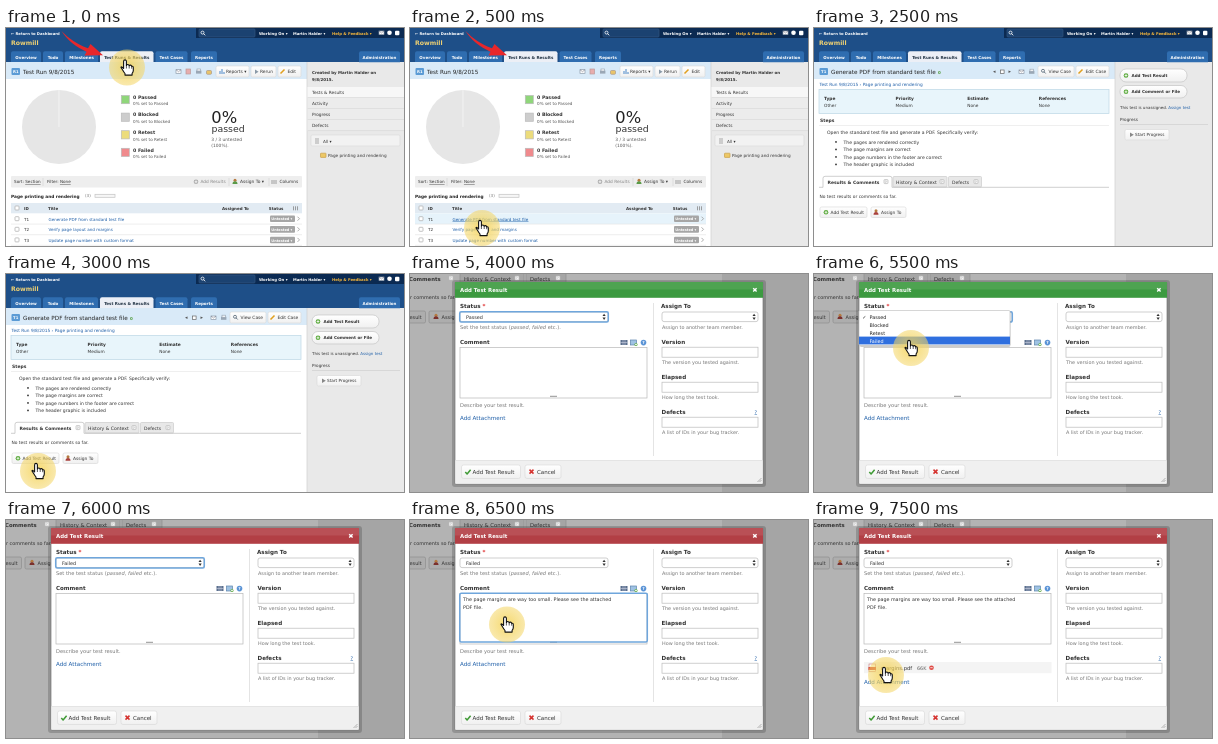
These frames come from a looping animation (398x218 px, 8 s). An HTML page:

```html
<!DOCTYPE html>
<html lang="en">
<head>
<meta charset="utf-8">
<title>Test run walkthrough</title>
<style>
html, body { margin: 0; width: 100%; height: 100%; overflow: hidden; background: #fff; }
svg { display: block; width: 100vw; height: 100vh; font-family: "DejaVu Sans", Verdana, sans-serif; }
text { white-space: pre; }
</style>
</head>
<body>
<svg id="stage" viewBox="0 0 398 218"></svg>
<script>
const INK = '#333', GREY = '#777', LINK = '#1f5fa8', NAVY = '#1e4f88';

const rect = (x, y, w, h, fill, stroke = 'none', r = 0) =>
  `<rect x="${x}" y="${y}" width="${w}" height="${h}" rx="${r}" fill="${fill}" stroke="${stroke}" stroke-width=".7"/>`;
const text = (x, y, s, size = 4.15, fill = INK, attrs = '') =>
  `<text x="${x}" y="${y}" font-size="${size}" fill="${fill}" ${attrs}>${s}</text>`;
const bold = (x, y, s, size = 4.1, fill = INK) => text(x, y, s, size, fill, 'font-weight="700"');
const dot = (x, y, r, fill) => `<circle cx="${x}" cy="${y}" r="${r}" fill="${fill}"/>`;
const path = (d, fill = 'none', stroke = 'none', w = 1) =>
  `<path d="${d}" fill="${fill}" stroke="${stroke}" stroke-width="${w}" stroke-linejoin="round"/>`;
const group = (id, body) => `<g id="${id}">${body}</g>`;
const each = (list, fn) => list.map(fn).join('');
const fade = (opacity, body) => `<g opacity="${opacity}">${body}</g>`;

const plus = (x, y, r = 2.3) => dot(x, y, r, '#58a838') +
  path(`M${x - r * .6} ${y}h${r * 1.2}M${x} ${y - r * .6}v${r * 1.2}`, 'none', '#fff', .8);
const pencil = (x, y) => path(`M${x - 2} ${y + 2}l4 -4`, 'none', '#e0a020', 1.6);
const person = (x, y, c) => dot(x, y - 1.4, 1.5, '#b5793f') + path(`M${x - 2.5} ${y + 2.5}a2.5 2.8 0 0 1 5 0z`, c);
const lens = (x, y, c) => `<circle cx="${x}" cy="${y}" r="1.5" fill="none" stroke="${c}" stroke-width=".8"/>` +
  path(`M${x + 1} ${y + 1}l1.7 1.7`, 'none', c, .9);
const mail = (x, y, c) => rect(x, y, 5, 3.6, c, '#8a98a8') + path(`M${x} ${y}l2.5 2l2.5 -2`, 'none', '#667', .5);
const printer = (x, y) => rect(x, y + 1.2, 5.4, 3, '#9aa7b5') + rect(x + 1, y - .4, 3.4, 2, '#fff', '#9aa7b5');
const columns = (x, y) => path(`M${x} ${y}v4M${x + 2} ${y}v4M${x + 4} ${y}v4`, 'none', '#888', .8);
const button = (x, y, w, h, label, dx, size = 4.4, r = 1.5) =>
  rect(x, y, w, h, 'url(#soft)', '#dcdcdc', r) + text(x + dx, y + h / 2 + size * .36, label, size);

const tabs = [[5, 30, 'Overview'], [37, 20, 'Todo'], [59, 33, 'Milestones'], [94, 53.5, 'Test Runs &amp; Results'],
  [149.5, 32, 'Test Cases'], [185, 26, 'Reports'], [353, 41, 'Administration']];

const header = rect(0, 0, 398, 218, '#fff') + rect(301, 34, 97, 184, '#e9e9e9') +
  rect(0, 0, 398, 34, NAVY) + rect(190, 0, 208, 10, '#0b2a52') +
  bold(5, 6.5, '← Return to Dashboard', 3.75, '#fff') +
  bold(5, 16.9, 'Rowmill', 6.2, '#f1d272') +
  rect(193, 1, 56, 8, '#1b4271', '#31557f', 1) + lens(196.5, 4.6, '#fff') +
  bold(253, 6.6, 'Working On ▾', 3.85, '#fff') + bold(287, 6.6, 'Martin Halder ▾', 3.75, '#fff') +
  bold(326, 6.6, 'Help &amp; Feedback ▾', 3.85, '#f5b63c') +
  mail(373, 3, '#fff') + dot(383.5, 4.8, 2.3, '#fff') + rect(389, 2.8, 4.4, 4.4, '#fff', 'none', 1) +
  each(tabs, ([x, w, s], i) => path(`M${x} 34.2v-9q0 -2 2 -2h${w - 4}q2 0 2 2v9z`, i === 3 ? '#eceff6' : '#2f6db0') +
    text(x + w / 2, 30.5, s, 4.05, i === 3 ? '#234' : '#fff', 'font-weight="700" text-anchor="middle"')) +
  rect(0, 34, 301, 17, '#d9eaf8') + path('M301 34v184', 'none', '#d0d0d0', .7);

const badge = (s) => rect(5.5, 40, 8.5, 7, '#5b9bd5', 'none', 1) + bold(7.1, 45.2, s, 3.8, '#fff');
const box = (x, y) => rect(x, y, 4, 4, '#fff', '#aaa', .7);

const counts = [['Passed', '#8fd67a'], ['Blocked', '#cdcdcd'], ['Retest', '#ecdc7c'], ['Failed', '#f08a8d']];
const tests = ['Generate PDF from standard test file', 'Verify page layout and margins', 'Update page number with custom format'];
const underlined = s => `<tspan text-decoration="underline">${s}</tspan>`;

const list = badge('R1') + text(17, 46, 'Test Run 9/8/2015', 5.7, '#222') +
  mail(170, 41.7, '#fff') + rect(180, 41, 4.5, 5, '#e7adad', '#b99') + printer(190, 41.4) + rect(200.5, 42.5, 5, 3.8, '#e9c46a', '#a98', 1) +
  button(210, 38, 33, 11, 'Reports ▾', 10) + path('M214 46v-3M216 46v-5M218 46v-2', 'none', '#4a87c8', 1) +
  button(245, 38, 25, 11, 'Rerun', 9) + path('M249 41.5v4.4l3.6 -2.2z', '#8a9aa8') +
  button(272, 38, 23, 11, 'Edit', 9.5) + pencil(276.5, 43.5) +
  dot(53, 99, 37, '#e6e6e6') + path('M53 62v37', 'none', '#f7f7f7', .8) +
  each(counts, ([s, c], i) => {
    const y = 67.5 + i * 17.6;
    return rect(115.3, y, 8, 8.2, c, '#bbb') + bold(127, y + 3.2, '0 ' + s, 4.7) + text(127, y + 9.9, '0% set to ' + s, 4.15, '#555');
  }) +
  text(205.3, 95, '0%', 16.3, '#222') + text(205.5, 104, 'passed', 9.4) +
  text(205.3, 112.6, '3 / 3 untested', 4.4, '#555') + text(205.3, 119, '(100%).', 4.4, '#555') +
  rect(5, 148, 291, 11.5, '#eee', 'none', 1) +
  text(8, 155.3, 'Sort: ' + underlined('Section')) + text(41, 155.3, 'Filter: ' + underlined('None')) +
  path('M37 150v8M223 150v8M263 150v8', 'none', '#d2d2d2', .6) +
  dot(190, 153.8, 2.3, '#aaa') + path('M188.6 153.8h2.8M190 152.4v2.8', 'none', '#fff', .8) + text(194.5, 155.3, 'Add Results', 4.3, '#888') +
  person(229, 153.6, '#5a9a48') + text(234, 155.3, 'Assign To ▾', 4.4) +
  columns(266, 152) + text(273.5, 155.3, 'Columns', 4.3) +
  bold(5, 169.5, 'Page printing and rendering', 4.3, '#222') + text(79, 169.3, '(3)', 4.1, GREY) +
  rect(89, 166.3, 20, 3, '#f6f6f6', '#c4c4c4') +
  rect(5, 175, 291, 10.3, '#e2ebf3') + box(9, 178) +
  bold(18, 182, 'ID', 4) + bold(42, 182, 'Title', 4) + bold(216, 182, 'Assigned To', 4) + bold(262.8, 182, 'Status', 4) + columns(287.5, 178.3) +
  group('hover', rect(5, 185.5, 291, 10.5, '#e6f3fb') + path('M42.5 193.4h76', 'none', LINK, .5)) +
  each(tests, (s, i) => {
    const y = 192.5 + i * 10.6;
    return path(`M5 ${y + 3.6}h291`, 'none', '#e2e2e2', .6) + box(9, y - 3.8) + text(18, y, 'T' + (i + 1)) + text(42.5, y, s, 4.12, LINK) +
      rect(264, y - 5, 25, 6.6, '#a6a6a6', 'none', 1) + bold(265.3, y - .2, 'Untested ▾', 3.5, '#fff') +
      path(`M291.5 ${y - 3.8}l2 2l-2 2`, 'none', '#999', .8);
  }) +
  bold(306, 46.3, 'Created by Martin Halder on', 4) + bold(306, 53, '9/8/2015.', 4) +
  each(['Tests &amp; Results', 'Activity', 'Progress', 'Defects'], (s, i) =>
    rect(301.5, 59 + i * 11, 96.5, 10.4, i ? '#ececec' : '#f7f7f7') + path(`M302 ${69.6 + i * 11}h96`, 'none', '#d6d6d6', .6) +
    text(306, 66 + i * 11, s, 4.3)) +
  rect(305, 107, 89, 11, '#f2f2f2', '#dcdcdc', 1) + path('M309 111h4M309 113h4M309 115h4', 'none', '#888', .7) + text(317, 114.5, 'All ▾', 4.2) +
  rect(314.5, 125.2, 5.5, 4.2, '#edc866', '#c9a04a', .5) + text(322, 129, 'Page printing and rendering', 4.2) +
  path('M55.5 3C63 11 71 16 82 20.3L84.5 16L97 27.3L78.5 27.5L80.5 23.7C70 19 61 12 55.5 3Z', '#e8272b');

const facts = [['Type', 'Other'], ['Priority', 'Medium'], ['Estimate', 'None'], ['References', 'None']];
const checks = ['The pages are rendered correctly', 'The page margins are correct',
  'The page numbers in the footer are correct', 'The header graphic is included'];
const help = (x, y) => rect(x, y, 4, 4, '#f3f3f3', '#bbb', .6) + text(x + 1.1, y + 3.2, '?', 3, '#888');

const detail = badge('T1') + text(17, 46, tests[0], 5.7, '#222') + bold(124, 45.5, '0', 4, '#4f9a3a') +
  text(179, 45.3, '◂', 5, '#555') + rect(186.5, 42, 3.6, 3.4, '#fff', '#666') + text(194.5, 45.3, '▸', 5, '#555') +
  mail(205, 42, '#fff') + printer(215, 41.6) +
  button(224, 38, 36, 11, 'View Case', 10.5) + lens(229, 42.8, '#567') +
  button(262, 38, 33, 11, 'Edit Case', 9.5) + pencil(266.5, 43.5) +
  text(5.5, 57.5, 'Test Run 9/8/2015 › Page printing and rendering', 4.3, LINK) +
  rect(5, 61.5, 290, 24, '#e8f5fb', '#bcd8e6') +
  each(facts, ([a, b], i) => bold(10 + i * 71.6, 71.7, a, 4.35) + text(10 + i * 71.6, 78.5, b, 4.3)) +
  bold(6, 93.6, 'Steps', 4.5) + path('M5 97.5h290', 'none', '#e4e4e4', .6) +
  text(13, 106.3, 'Open the standard test file and generate a PDF. Specifically verify:', 4.55) +
  each(checks, (s, i) => dot(22, 113.9 + i * 7.5, .9, INK) + text(29.5, 115.5 + i * 7.5, s, 4.55)) +
  rect(79, 148.5, 54, 10.5, '#e8e8e8', '#ccc', 1) + rect(134.5, 148.5, 33, 10.5, '#e8e8e8', '#ccc', 1) +
  path('M5 159.3h4v-9q0 -2 2 -2h65q2 0 2 2v9h217', '#fff', '#bbb', .7) +
  bold(13.5, 155.5, 'Results &amp; Comments', 4.45) + help(70, 151.6) +
  text(82, 155.5, 'History &amp; Context', 4.6) + help(126, 151.6) + text(138, 155.5, 'Defects', 4.5) + help(160, 151.6) +
  text(5.5, 170.3, 'No test results or comments so far.', 4.4) +
  button(6, 179, 47, 10.5, 'Add Test Result', 10.5) + plus(12, 184.3) +
  button(57, 179, 35, 10.5, 'Assign To', 10) + person(62, 184.2, '#a8403c') +
  rect(306, 41, 67, 13, 'url(#soft)', '#c4c4c4', 6) + plus(312, 47.5) + bold(317.5, 49, 'Add Test Result', 4.1) +
  rect(306, 57.5, 67, 12.5, 'url(#soft)', '#c4c4c4', 6) + plus(312, 63.8) + bold(317.5, 65.3, 'Add Comment or File', 4.1) +
  text(306, 81, 'This test is unassigned. <tspan fill="#1f5fa8">Assign test</tspan>', 4) +
  text(306, 93, 'Progress', 4.2) + path('M306 96.5h88', 'none', '#ccc', .6) +
  button(311, 101.5, 44, 10.5, 'Start Progress', 10, 4.2) + path('M316 104.5v4.6l3.8 -2.3z', '#888');

const select = (x, y, w) => rect(x, y, w, 9.6, '#fff', '#bbb', 2) +
  path(`M${x + w - 5.5} ${y + 4}l1.6 -2.3l1.6 2.3zM${x + w - 5.5} ${y + 5.6}l1.6 2.3l1.6 -2.3z`, INK);
const fields = [['Version', 'The version you tested against.'], ['Elapsed', 'How long the test took.'], ['Defects', 'A list of IDs in your bug tracker.']];

const backdrop = rect(0, 0, 398, 218, '#b3b3b3') + rect(312, 0, 86, 218, '#a5a5a5') +
  rect(50, -3, 64, 13, '#a5a5a5', '#8f8f8f') + rect(116, -3, 40, 13, '#a5a5a5', '#8f8f8f') + path('M48 10.3h258', 'none', '#8a8a8a', .7) +
  bold(-1, 6.5, 'Comments', 5.3) + help(39, 2) + text(54, 6.5, 'History &amp; Context', 5.3) + help(105, 2) + text(120, 6.5, 'Defects', 5.3) + help(146, 2) +
  text(-3, 24.5, 'or comments so far.', 4.9) +
  rect(-9, 37, 24.5, 12, '#adadad', '#8f8f8f', 1.5) + text(-.5, 45, 'esult', 5) +
  rect(19, 37, 42, 12, '#adadad', '#8f8f8f', 1.5) + person(26, 42.6, '#7b302d') + text(31.5, 45, 'Assign To', 5);

const dialog = backdrop + fade(.18, rect(42, 6, 314, 207, '#000', 'none', 3)) +
  rect(45, 8, 308, 202, '#fff', '#777', 1) +
  `<rect id="bar" x="45" y="8" width="308" height="15.8"/>` + fade(.09, rect(45, 8, 308, 7.5, '#fff')) +
  bold(50, 18, 'Add Test Result', 5.4, '#fff') + path('M343.2 14.2l3.4 3.4m0 -3.4l-3.4 3.4', 'none', '#fff', 1.4) +
  rect(45.4, 186.5, 307.2, 23.2, '#f0f0f0') + path('M45 186.5h308', 'none', '#ddd', .7) + path('M243.5 29v153', 'none', '#ddd', .8) +
  button(51.5, 191, 59, 13.5, 'Add Test Result', 11, 5.5, 2) + path('M55.3 198l1.8 2l3.5 -4.2', 'none', '#3f9a35', 1.5) +
  button(115, 191, 36, 13.5, 'Cancel', 12, 5.5, 2) + path('M119.5 195.6l4 4m0 -4l-4 4', 'none', '#d5322f', 1.5) +
  path('M347.5 208l4 -4m-2 4l2 -2', 'none', '#888', .6) +
  bold(50, 33.7, 'Status <tspan fill="#d22">*</tspan>', 5.6) + select(50, 38, 148) + text(56, 44.8, '', 4.9, INK, 'id="status"') +
  text(50, 55, 'Set the test status (<tspan font-style="italic">passed</tspan>, <tspan font-style="italic">failed</tspan> etc.).', 5.1, GREY) +
  bold(50, 69.6, 'Comment', 5.5) +
  rect(210.5, 66, 7, 5, '#5a6f8d') + path('M213 66v5M215 66v5M210.5 68.5h7', 'none', '#dde', .5) +
  rect(220.5, 66, 6, 5, '#9fc2e3', '#5c83ac') + plus(226, 70.5, 1.5) + dot(233.5, 68.6, 2.8, '#5b94d6') + bold(232.2, 70.4, '?', 4.2, '#fff') +
  rect(50, 73.5, 187, 50.5, '#fff', '#b8b8b8') + path('M140 122.3h7', 'none', '#888', .9) +
  text(50, 132.5, 'Describe your test result.', 5.1, GREY) +
  group('file', rect(50, 142, 187.5, 11.2, '#f4f4f4') + rect(55, 144, 6.5, 7.5, '#fff', '#c88') + rect(54.5, 147, 7.5, 3, '#d33a32') +
    text(67, 149.6, 'margins.pdf', 5.2) + text(103, 149.6, '66K', 4.9, '#666') + dot(117.5, 147.7, 2.3, '#df4a45') + path('M116.3 147.7h2.4', 'none', '#fff', .8)) +
  text(50, 146, 'Add Attachment', 5.6, LINK, 'id="attach"') +
  bold(251, 33.7, 'Assign To', 5.6) + select(252, 38, 96) + text(252, 55, 'Assign to another team member.', 4.9, GREY) +
  each(fields, ([a, b], i) => {
    const y = 69.5 + i * 35;
    return bold(251.5, y, a, 5.6) + rect(252, y + 3.7, 96, 10, '#fff', '#bbb') + text(252, y + 20, b, 4.9, GREY);
  }) + text(344.5, 139.5, '?', 4.8, LINK, 'text-decoration="underline"');

const ring = (id, x, y, w, h) => group(id, `<rect x="${x}" y="${y}" width="${w}" height="${h}" rx="1.5" fill="none" stroke="#6fa6dc" stroke-width="1.5"/>`);

const menu = fade(.2, rect(45.5, 37, 151, 36, '#000', 'none', 2)) + rect(45, 36.5, 151, 34.8, '#fff', '#c4c4c4', 1) +
  rect(45, 62.6, 151, 7.8, '#2f6fdf') + text(48.3, 44.8, '✓', 5) +
  each(counts, ([s], i) => text(55.5, 44.8 + i * 7.95, s, 4.9, i === 3 ? '#fff' : '#222'));

const hand = 'M-3.4 1V-6q0 -1.6 1.4 -1.6T-.6 -6v4q.3 -1 1.4 -1t1.4 1.3q.4 -.8 1.3 -.7t1.2 1.3q1.6 -.6 1.6 1.2V3q0 1.6 -1.2 2.8V7.6H-2V6Q-3.2 4.6 -4.2 2.8T-6 0q.2 -1.6 2.6 1z';

const stage = document.getElementById('stage');
stage.innerHTML = `<defs><linearGradient id="soft" x2="0" y2="1"><stop stop-color="#fff"/><stop offset="1" stop-color="#f0f0f0"/></linearGradient>
  <radialGradient id="glow"><stop offset=".3" stop-color="#f4d358" stop-opacity=".75"/><stop offset="1" stop-color="#f4d668" stop-opacity=".55"/></radialGradient></defs>` +
  group('page', header) + group('list', list) + group('detail', detail) +
  group('dialog', dialog) + ring('statusRing', 49.7, 37.7, 148.6, 10.2) +
  ring('noteRing', 49.8, 73.2, 187.5, 48.8) +
  group('note', text(53, 80.8, 'The page margins are way too small. Please see the attached', 4.8) + text(53, 88.6, 'PDF file.', 4.8)) +
  group('menu', menu) +
  group('cursor', dot(0, 0, 18, 'url(#glow)') + path(hand, '#fff', '#111', 1.1) + path('M-.6 -2v3M2.2 -1.7v2.7M4.7 -1v2.2', 'none', '#111', .7));

const el = id => document.getElementById(id);
const layers = ['page', 'list', 'hover', 'detail', 'dialog', 'statusRing', 'noteRing', 'note', 'menu', 'file'];
// start time, visible layers, cursor centre
const steps = [
  [0, 'page list', [121, 39.5]],
  [500, 'page list hover', [72, 200]],
  [2500, 'page detail'],
  [3000, 'page detail', [32, 197]],
  [4000, 'dialog statusRing'],
  [5000, 'dialog statusRing', [96.5, 55]],
  [5500, 'dialog statusRing menu', [97, 74]],
  [6000, 'dialog statusRing'],
  [6500, 'dialog noteRing note', [97, 104.5]],
  [7000, 'dialog noteRing note', [72, 155]],
  [7500, 'dialog note file', [72, 155]]
];

let current;
function draw() {
  const t = performance.now() % 8000;
  const step = steps.findLast(s => s[0] <= t);
  if (step !== current) {
    current = step;
    const [start, names, at] = step;
    const shown = names.split(' ');
    for (const id of layers) el(id).style.display = shown.includes(id) ? '' : 'none';
    el('cursor').style.display = at ? '' : 'none';
    if (at) el('cursor').setAttribute('transform', `translate(${at})`);
    const failed = start >= 6000;
    el('bar').setAttribute('fill', failed ? '#b23f45' : '#3c9a40');
    el('status').textContent = failed ? 'Failed' : 'Passed';
    el('attach').setAttribute('y', shown.includes('file') ? 163.6 : 146);
  }
  requestAnimationFrame(draw);
}
draw();
</script>
</body>
</html>
```
